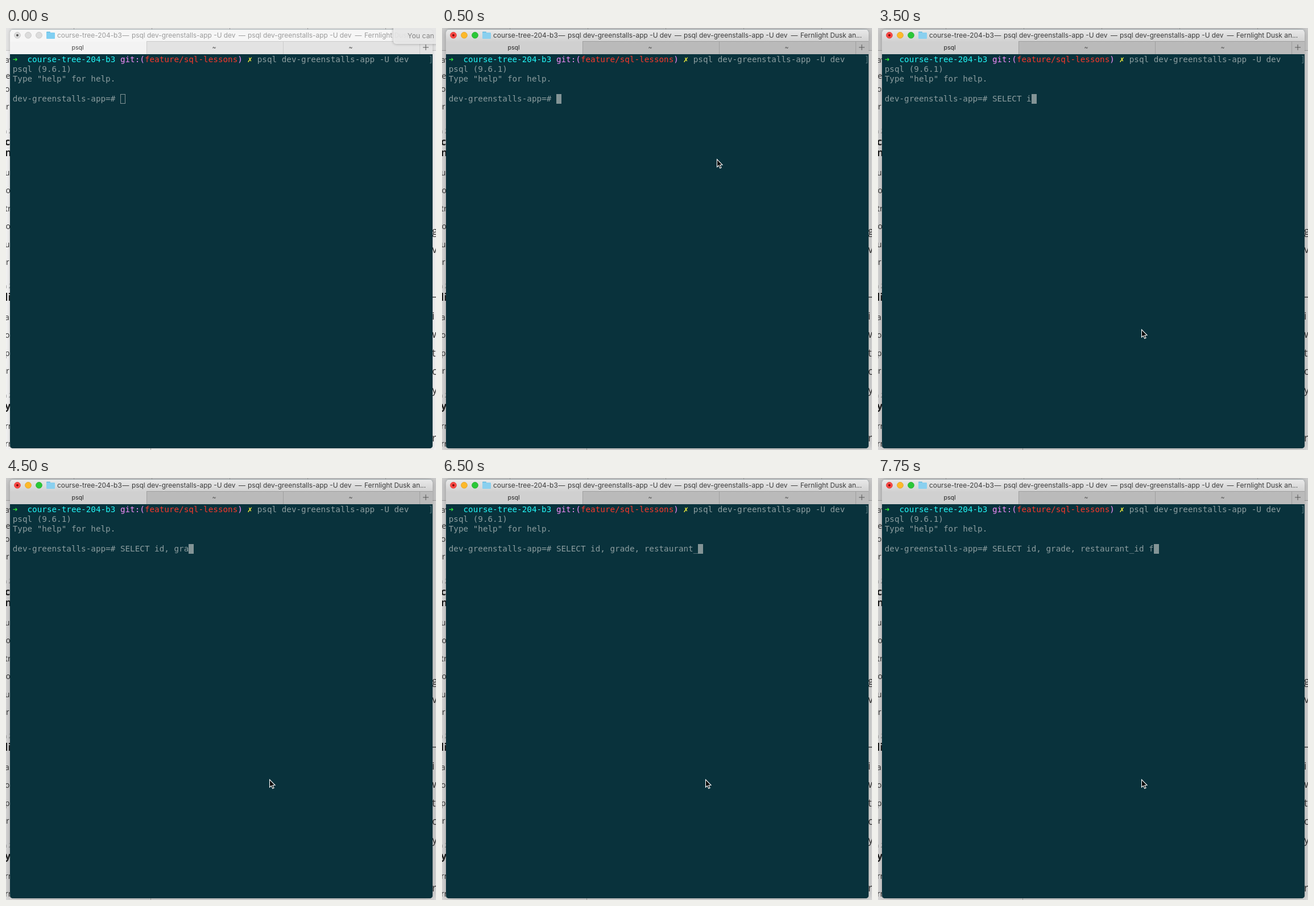
An HTML page with a canvas for the animation above (8 s loop, 756 by 741 pixels).

```html
<!DOCTYPE html>
<html lang="en">
<head>
<meta charset="utf-8">
<title>Terminal session</title>
<style>
  html, body { margin: 0; width: 100%; height: 100%; overflow: hidden; }
  canvas { display: block; }
</style>
</head>
<body>
<canvas id="stage" width="756" height="741"></canvas>
<script>
const g = document.getElementById('stage').getContext('2d');
const LOOP = 8000, FOCUS = 500, REST = 750;
const CELL = 8.6, ROW = 17.2, LEFT = 11.7, BASE = 60;
const MONO = '14.28px "DejaVu Sans Mono", monospace';
const UI = 'Inter, Roboto, sans-serif';
const PAGE = '"Open Sans", "Noto Sans", sans-serif';
const GREY = '#8c9d9f', BLOCK = '#839496';

const app = 'dev-greenstalls-app';
const command = `psql ${app} -U dev`;
const prompt = app + '=# ';
const query = 'SELECT id, grade, restaurant_id from';

// [time, visible characters of the query]
const typing = [
  [0, 0], [2000, 2], [2250, 4], [2500, 5], [2750, 6], [3000, 7],
  [3500, 8], [3750, 9], [4000, 10], [4250, 12], [4500, 14], [4750, 16], [5000, 18],
  [5500, 21], [5750, 24], [6000, 26], [6250, 28], [6500, 29],
  [6750, 31], [7000, 33], [7250, 36], [7500, 35], [7750, 33]
];

function typedAt(t) {
  if (t >= 1250 && t < 1750) return 'se';
  return query.slice(0, typing.findLast(step => t >= step[0])[1]);
}

function box(x, y, w, h, fill, radius = 0) {
  g.fillStyle = fill;
  g.beginPath();
  g.roundRect(x, y, w, h, radius);
  g.fill();
}

function label(text, x, y, font, color, align = 'left') {
  g.font = font;
  g.fillStyle = color;
  g.textAlign = align;
  g.fillText(text, x, y);
}

function mono(text, col, row, color) {
  [...text].forEach((c, i) => label(c, LEFT + (col + i) * CELL, BASE + row * ROW, MONO, color));
}

function vertical(y0, y1, top, bottom) {
  const fill = g.createLinearGradient(0, y0, 0, y1);
  fill.addColorStop(0, top);
  fill.addColorStop(1, bottom);
  return fill;
}

function drawPage(active) {
  box(0, 0, 756, 741, active ? '#dcdcdc' : '#f1f1f1');
  box(0, 0, 756, 39, active ? '#d0d0d0' : '#e4e4e4');
  box(0, 39, 756, 1, active ? '#a5a5a5' : '#c4c4c4');
  for (let x = 119; x < 756; x += 137) box(x, 0, 1, 4, '#aaa');
  box(254, 738, 1, 3, '#aaa');

  const body = [[61, 'av'], [89, '’e'], [112, 'o'], [143, '’r'], [259, 'ur'], [290, '’o'],
    [322, 'tr'], [353, '’o'], [385, 'u'], [416, '’r'], [513, 'a'], [544, 'o'],
    [576, 'p'], [607, '’r'], [704, 'rr'], [735, 'rr']];
  for (const [y, s] of body) label(s, -2, y, '14px ' + PAGE, '#333');
  for (const y of [185, 457, 649]) label('n 2', -5, y, '11px ' + PAGE, '#999');
  for (const [y, s] of [[206, 'c'], [225, 'n'], [479, 'li'], [670, 'y']])
    label(s, -2, y, 'bold 18px ' + PAGE, '#222');
  const right = [[363, 'g'], [395, 'v'], [478, '–'], [512, 'i'], [544, 'w'],
    [577, 't'], [609, 'o'], [642, 'y'], [726, 'r']];
  for (const [y, s] of right) label(s, 749, y, '18px ' + PAGE, '#333');
}

function drawLight(x, fill, edge) {
  g.beginPath();
  g.arc(x, 12.7, 5.4, 0, 7);
  g.fillStyle = fill;
  g.fill();
  g.strokeStyle = edge;
  g.lineWidth = .8;
  g.stroke();
}

function drawBar(active) {
  g.save();
  g.beginPath();
  g.roundRect(7, 2.5, 743, 60, 5);
  g.clip();
  box(7, 2, 743, 22, active ? vertical(3, 24, '#e9e9e9', '#d1d1d1') : '#f6f6f6');
  box(7, 24, 240, 22, active ? '#d0d0d0' : '#f3f3f3');
  box(247, 24, 503, 22, active ? '#bababa' : '#e3e3e3');
  const line = active ? '#a0a0a0' : '#cccccc';
  box(247, 23, 503, 1, line);
  for (const x of [247, 487, 727]) box(x, 24, 1, 22, line);
  g.restore();

  const lights = active
    ? [['#fc4744', '#dd3430'], ['#fdb92a', '#dfa023'], ['#2bc837', '#1faa2a']]
    : Array(3).fill(['#dcdcdc', '#c2c2c2']);
  lights.forEach(([fill, edge], i) => drawLight(20 + 19 * i, fill, edge));
  g.beginPath();
  g.arc(20, 12.7, 2, 0, 7);
  g.fillStyle = active ? '#760e0c' : '#555';
  g.fill();

  box(71, 6.5, 7, 4, '#62bbe2', 1);
  box(71, 8, 15, 11, active ? '#8ad0ef' : '#80cff2', 1);

  const ink = active ? '#3c3c3c' : '#9c9c9c', font = '11.9px ' + UI;
  label('course-tree-204-b3', 90, 17, font, ink);
  label(command, 221, 17, font, ink);
  label(command, 425, 17, font, ink);
  label('Fernlight Dusk an...', 630, 17, font, ink);
  for (const x of [210.5, 415, 619.5]) label('—', x, 17, font, ink, 'center');

  label('psql', 126, 38, '10.6px ' + UI, active ? '#222' : '#444', 'center');
  for (const x of [366, 606]) label('~', x, 38, '10.6px ' + UI, '#555', 'center');
  box(733, 33.5, 10, 1, '#555');
  box(737.5, 29, 1, 10, '#555');
}

function drawTerminal(t, active) {
  box(7, 46, 743, 692, '#09323c', [0, 0, 5, 5]);
  mono('➜', 0, 0, '#2fe83a');
  mono('course-tree-204-b3', 3, 0, '#22f7f7');
  mono('git:(', 22, 0, '#f48bfa');
  mono('feature/sql-lessons', 27, 0, '#f7382b');
  mono(')', 46, 0, '#f48bfa');
  mono('✗', 48, 0, '#f5f13a');
  mono(command, 50, 0, GREY);
  mono(']', 85, 0, '#54737a');
  mono('psql (9.6.1)', 0, 1, GREY);
  mono('Type "help" for help.', 0, 2, GREY);

  const line = prompt + typedAt(t);
  mono(line, 0, 4, GREY);
  const x = Math.round(LEFT + line.length * CELL);
  if (active) {
    box(x, 116, 9, 17, BLOCK);
  } else {
    g.strokeStyle = BLOCK;
    g.lineWidth = 1;
    g.strokeRect(x + .5, 116.5, 8, 16);
  }
}

function drawNotice() {
  g.save();
  g.shadowColor = 'rgba(0,0,0,.35)';
  g.shadowBlur = 5;
  box(681, -20, 100, 48, 'rgba(240,240,240,.88)', 5);
  g.restore();
  label('You can', 706, 18, '12.3px ' + UI, '#858585');
}

function drawPointer(x, y) {
  g.save();
  g.translate(x, y);
  g.beginPath();
  [[.5, .5], [.5, 14], [3.5, 11.3], [5.8, 16.3], [8, 15.3], [5.8, 10.5], [10, 10.3]]
    .forEach(p => g.lineTo(...p));
  g.closePath();
  g.fillStyle = '#000';
  g.fill();
  g.strokeStyle = '#fff';
  g.lineWidth = 1.1;
  g.stroke();
  g.restore();
}

function frame(now) {
  const t = now % LOOP, active = t >= FOCUS;
  drawPage(active);
  g.save();
  g.shadowColor = active ? 'rgba(0,0,0,.3)' : 'rgba(0,0,0,.2)';
  g.shadowBlur = active ? 14 : 6;
  box(7, 2.5, 743, 735.5, '#09323c', 5);
  g.restore();
  drawBar(active);
  drawTerminal(t, active);
  if (t < 250) drawNotice();
  if (active) drawPointer(...(t < REST ? [483, 230] : [463, 529]));
  requestAnimationFrame(frame);
}
requestAnimationFrame(frame);
</script>
</body>
</html>
```
